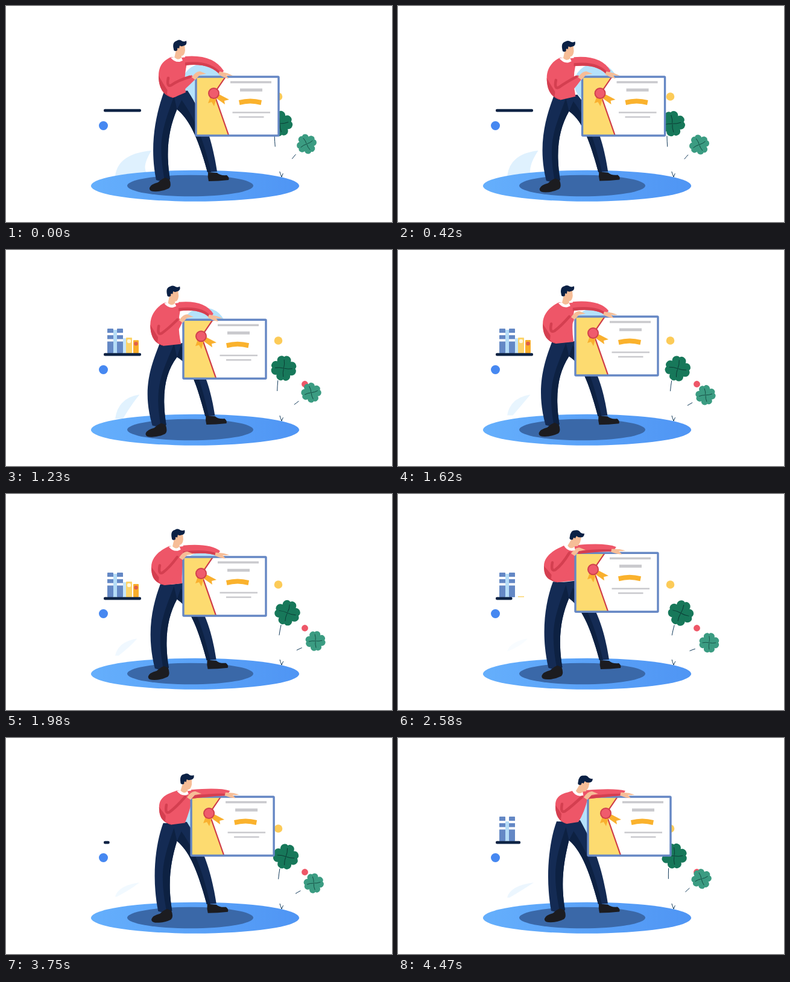
Recreate the animation shown at these times as an HTML page. Size 640x360 px, loop 4500 ms.

```html
<!DOCTYPE html>
<html lang="en">
<head>
<meta charset="utf-8">
<title>Certificate</title>
<style>
  html, body { margin: 0; width: 100%; height: 100%; overflow: hidden; background: #fff; }
  svg { display: block; width: 100%; height: 100%; }
</style>
</head>
<body>
<svg viewBox="0 0 640 360">
  <defs>
    <linearGradient id="floor"><stop offset="0" stop-color="#65affc"/><stop offset="1" stop-color="#4f95f4"/></linearGradient>
    <g id="heart">
      <path d="M0 0C-10-4-14-13-9-18Q-4-22 0-18.500Q4-22 9-18C14-13 10-4 0 0Z"/>
      <path d="M0 0Q1.500-7 0-14" fill="none" stroke="#0c3a34" stroke-width=".9"/>
    </g>
    <g id="clover">
      <use href="#heart"/><use href="#heart" transform="rotate(90)"/>
      <use href="#heart" transform="rotate(180)"/><use href="#heart" transform="rotate(270)"/>
    </g>
  </defs>

  <path id="leaf" fill="#dff1fe"/>
  <ellipse cx="313.500" cy="299.700" rx="172.700" ry="26" fill="url(#floor)"/>
  <ellipse cx="305.500" cy="299.500" rx="104.500" ry="17.800" fill="#3a68a8"/>
  <ellipse cx="328" cy="129" rx="36" ry="33" fill="#b5e2fb"/>

  <circle cx="161.500" cy="199.500" r="7.500" fill="#4688f1"/>
  <g id="books"></g>
  <rect id="shelf" x="162" y="171.700" height="4.800" rx="2" fill="#0d2344"/>

  <circle cx="451.500" cy="151" r="6.800" fill="#fccb58"/>
  <circle cx="495.500" cy="223.500" r="5.400" fill="#ee5768"/>
  <g fill="none" stroke="#123a5a" stroke-width="1">
    <path id="stemA" pathLength="100" stroke-dasharray="13 55 24 100"/>
    <path id="stemB" pathLength="100" stroke-dasharray="11 48 16 100"/>
  </g>
  <use id="cloverA" href="#clover" fill="#17785a"/>
  <use id="cloverB" href="#clover" fill="#3b9c82"/>

  <path id="farLeg" fill="#142b54"/>
  <path id="farShade" fill="#0d2142"/>
  <path id="nearLeg" fill="#142b54"/>
  <path id="nearShade" fill="#0d2142"/>
  <path id="shoeL" fill="#1c1c20" d="M0-6Q2-12 14-15Q20-21 26-23L33-20Q37-9 32-5Q20 1 6 0Q-1-1 0-6Z"/>
  <path id="shoeR" fill="#1c1c20" d="M0-15L15-14Q20-9 31-10Q36-6 34-2L17-.500L1 0Q-1-7 0-15Z"/>

  <path id="torso" fill="#ee5668"/>
  <path id="torsoShade" fill="#d43f50"/>

  <g id="cert">
    <rect x="1" y="1" width="137" height="98" fill="#fff"/>
    <path d="M0 0H50L31 29L55 99H0Z" fill="#fddb70"/>
    <path d="M50 1L31 29L55 98" fill="none" stroke="#cf3c48" stroke-width="2.200"/>
    <rect x="1" y="1" width="137" height="98" rx="1" fill="none" stroke="#6587c4" stroke-width="3.400"/>
    <path d="M25 34L21 45L27 43L31 50L35 36ZM35 37L49 47L48 41L56 39L39 30Z" fill="#f9b02f"/>
    <circle cx="30.500" cy="28.500" r="9.500" fill="#d0404c"/>
    <circle cx="30.500" cy="28.500" r="7.500" fill="#ef5b6c"/>
    <g stroke="#c9c9cd">
      <path d="M58 10H126" stroke-width="3.400"/>
      <path d="M74 23H111" stroke-width="4.800"/>
      <path d="M61.500 60.500H124M72 68H113.500" stroke-width="2.600"/>
    </g>
    <path d="M72 40Q91 35 110 40L108.500 48Q91 43 73.500 48Z" fill="#fab22d"/>
  </g>

  <path id="farArm" fill="#ee5668"/>
  <path id="armShade" fill="#d43f50"/>
  <path id="foreArm" fill="#ee5668"/>
  <path id="crease" fill="none" stroke="#d43f50" stroke-width="4.500" stroke-linecap="round"/>
  <path id="farHand" fill="#f6bd97" d="M-11-4L2-1L11 3L5 3L0 2L4 8Q-3 7-13 1Z"/>
  <path id="nearHand" fill="#f6bd97" d="M-9 5Q-2-6 5-5L15-1Q9 0 4 1L-3 9Z"/>

  <g id="head">
    <path fill="#f6bd97" d="M1-23L13-24L14-14Q13-5 8-5L8 1Q2 7-4-1L-1-15Z"/>
    <path fill="#0b2145" d="M-5-16Q-8-28 0-30Q5-33 9-29.500Q13-28 16-30Q18-23 11-21.500Q7-20 5-22L4-17Q2-19 1-17Q2-13-2-13Q-5-13-5-16Z"/>
  </g>
  <path id="collar" fill="#fff" d="M-10-2L-4-3Q2 4 8-2L10 3L5 5Q-4 6-10-2Z"/>
</svg>

<script>
const LOOP = 4500, STEP = 30;
const $ = id => document.getElementById(id);
const draw = (id, d) => $(id).setAttribute("d", d);
const place = (id, x, y, extra = "") =>
  $(id).setAttribute("transform", `translate(${x} ${y})${extra}`);
const ease = (t, a, b) => {
  const u = Math.min(1, Math.max(0, (t - a) / (b - a)));
  return u * u * (3 - 2 * u);
};

// Three moves: pull left, lift, push right
const move = (t, a, b, c, d) =>
  a + (b - a) * ease(t, 0, 900) + (c - b) * ease(t, 900, 2700) + (d - c) * ease(t, 2700, 4500);

// x, width, height, colour, label
const books = [
  [168, 10, 41, "#6488c5", "#fff"],
  [178, 6, 39, "#b5dcf7"],
  [184, 10, 41, "#6488c5", "#fff"],
  [194, 5, 25, "#c5e5fa"],
  [199, 10, 26, "#fcd469", "#fff7dc"],
  [211, 9, 22, "#f9ae2b", "#e0604a"]
];
$("books").innerHTML = books.map(([x, w, h, fill, label]) => {
  const mark = !label ? "" : h > 40
    ? `<path d="M${x} ${9 - h}h${w}M${x} ${19.5 - h}h${w}" stroke="${label}" stroke-width="3.8"/>`
    : `<circle cx="${x + w / 2}" cy="${6 - h}" r="3.2" fill="${label}"/>`;
  return `<g><rect x="${x}" y="${-h}" width="${w}" height="${h}" rx="1" fill="${fill}"/>${mark}</g>`;
}).join("");
const bookNodes = [...$("books").children];

// Books rise from left to right; tall ones leave last and return first
function drawShelf(t) {
  bookNodes.forEach((node, i) => {
    const h = books[i][2];
    const rise = 420 + 90 * i, drop = 1700 + 24 * h, back = 6000 - 45 * h;
    const grow = ease(t, rise, rise + 380) - ease(t, drop, drop + 300) + ease(t, back, back + 300);
    node.setAttribute("transform", `translate(0 172) scale(1 ${grow})`);
  });
  $("shelf").setAttribute("width", 62 * (1 - ease(t, 2150, 2950) + ease(t, 3250, 5250)));
}

function drawPlants(t) {
  const s = (1 - Math.cos(t / 5400 * 2 * Math.PI)) / 2;
  const ax = 454 + 15 * s, ay = 196 + 2.5 * s;
  const bx = 498.5 + 17.5 * s, by = 230 + 18 * s;
  place("cloverA", ax, ay, ` rotate(${30 * s - 10}) scale(1.03)`);
  place("cloverB", bx, by, ` rotate(${30 * s - 30}) scale(.81)`);
  draw("stemA", `M457 285Q446 258 ${ax - 9} ${ay + 14}`);
  draw("stemB", `M457 285Q464 264 ${bx - 8} ${by + 6}`);

  const w = move(t, 60, 14, 1, 4), foot = move(t, 283, 283, 262, 266);
  draw("leaf", `M181 ${foot}Q186 246 ${move(t, 241, 222, 215, 225)} 241` +
    `Q${205 + w / 4} ${252 + w * .4} ${181 + w} ${foot}Z`);
  $("leaf").setAttribute("opacity", move(t, 1, 1, .2, .6));
}

function drawLegs(t, wx, wy, rx, ry) {
  const fl = move(t, 238, 231, 238.5, 243), fr = move(t, 335, 331, 335, 333);
  const cx = 283.5, cy = 108 + wy * .45;
  const a = fl + 11, ly = 309 - (fl - 238) * .4, ty = ly - 19;
  const bow = wy * .45 - 52;
  const inner = `C${a + 15} 240 ${a + 21} 205 ${cx} ${cy}`;
  draw("nearLeg", `M${wx} ${wy}C${wx - 12} ${wy + 32} ${a - bow} 230 ${a} ${ty}` +
    `Q${a + 12} ${ty + 4} ${a + 23} ${ty - 1}${inner}L${rx} ${ry}Z`);
  draw("nearShade", `M${cx - 5} ${cy - 22}C${cx - 24} 205 ${a + 2} 225 ${a + 14} ${ty + 1}` +
    `L${a + 23} ${ty - 1}${inner}Z`);
  const outer = `M${rx - 20} ${ry}L${cx} ${cy}C${cx + 22} 190 ${fr - 15} 225 ${fr - 1} 277`;
  draw("farLeg", `${outer}L${fr + 15} 276C${fr + 9} 238 ${fr} 193 ${rx + 3} ${ry - 3}Z`);
  draw("farShade", `${outer}L${fr + 5} 277C${fr - 7} 225 ${cx + 31} 187 ${cx + 3} ${cy - 22}Z`);
  place("shoeL", fl, ly);
  place("shoeR", fr, 292 + (fr - 335) * .25);
}

function drawBody(t, x, y) {
  const nx = move(t, 283, 271, 284.5, 298), ny = move(t, 88, 91, 89, 91);
  const bx = move(t, 253, 239, 242, 261), by = move(t, 116, 125, 120, 112);
  const ex = bx + move(t, 24, 22, 22, 19), ey = move(t, 153, 161, 147, 143);
  const wx = move(t, 262, 254, 257, 263), wy = move(t, 143, 158, 146, 139);
  const rx = wx + 36, ry = wy + 1;
  drawLegs(t, wx, wy, rx, ry);

  const belly = `C${bx} ${by + 18} ${bx + 6} ${ey - 4} ${ex} ${ey}`;
  draw("torso", `M${nx - 9} ${ny - 3}C${nx - 18} ${ny + 1} ${bx} ${by - 20} ${bx} ${by}${belly}` +
    `L${rx} ${Math.min(ry, ey - 3)}Q${nx + 11} ${ny + 34} ${nx + 17} ${ny + 8}L${nx + 17} ${ny - 3}L${nx + 9} ${ny - 2}Z`);
  draw("torsoShade", `M${bx} ${by}${belly}Q${bx + 14} ${ey - 12} ${bx} ${by}Z`);

  const hx = x + 3, hy = y - 3, ix = ex - 8, iy = ey - 27;
  draw("foreArm", `M${ix} ${iy}L${ex - 10} ${ey - 6}Q${ex - 3} ${ey + 1} ${ex + 5} ${ey - 2}` +
    `Q${ex + 20} ${ey - 14} ${hx - 4} ${hy + 9}L${hx - 9} ${hy + 1}Q${ex + 8} ${ey - 28} ${ix + 4} ${iy + 8}Z`);
  draw("crease", `M${ix} ${iy - 6}Q${ix - 3} ${iy + 10} ${ix + 5} ${iy + 6}Q${ex + 8} ${ey - 29} ${hx - 12} ${hy + 4}`);

  const reach = move(t, 51, 53, 73, 67), fx = x + reach, fy = y - 4;
  const sx = nx + 14, sy = ny + 3, mid = (sx + fx) / 2 + 12, top = ny - 8;
  const under = `L${fx - 9} ${fy + 3}Q${mid - 5} ${top + 14} ${sx} ${sy + 8}`;
  draw("farArm", `M${sx} ${sy - 7}Q${mid} ${top} ${fx - 4} ${fy - 5}${under}Z`);
  draw("armShade", `M${sx} ${sy + 3}Q${mid - 4} ${top + 9} ${fx - 7} ${fy}${under}Z`);

  // The head nods twice
  const tilt = 19 * (ease(t, 1900, 2640) - .8 * ease(t, 2640, 3500) + .8 * ease(t, 3600, 4470));
  place("farHand", fx, fy, ` rotate(${(51 - reach) / 2})`);
  place("nearHand", hx, hy);
  place("head", nx, ny, ` rotate(${tilt})`);
  place("collar", nx, ny, ` rotate(${tilt / 2})`);
}

function render(t) {
  const x = move(t, 314, 293, 293, 314), y = move(t, 117, 117, 97, 97);
  place("cert", x, y);
  drawPlants(t);
  drawShelf(t);
  drawBody(t, x, y);
}

const start = performance.now();
function tick(now) {
  const t = Math.max(0, now - start) % LOOP;
  render(Math.floor(t / STEP) * STEP);
  requestAnimationFrame(tick);
}
render(0);
requestAnimationFrame(tick);
</script>
</body>
</html>
```
